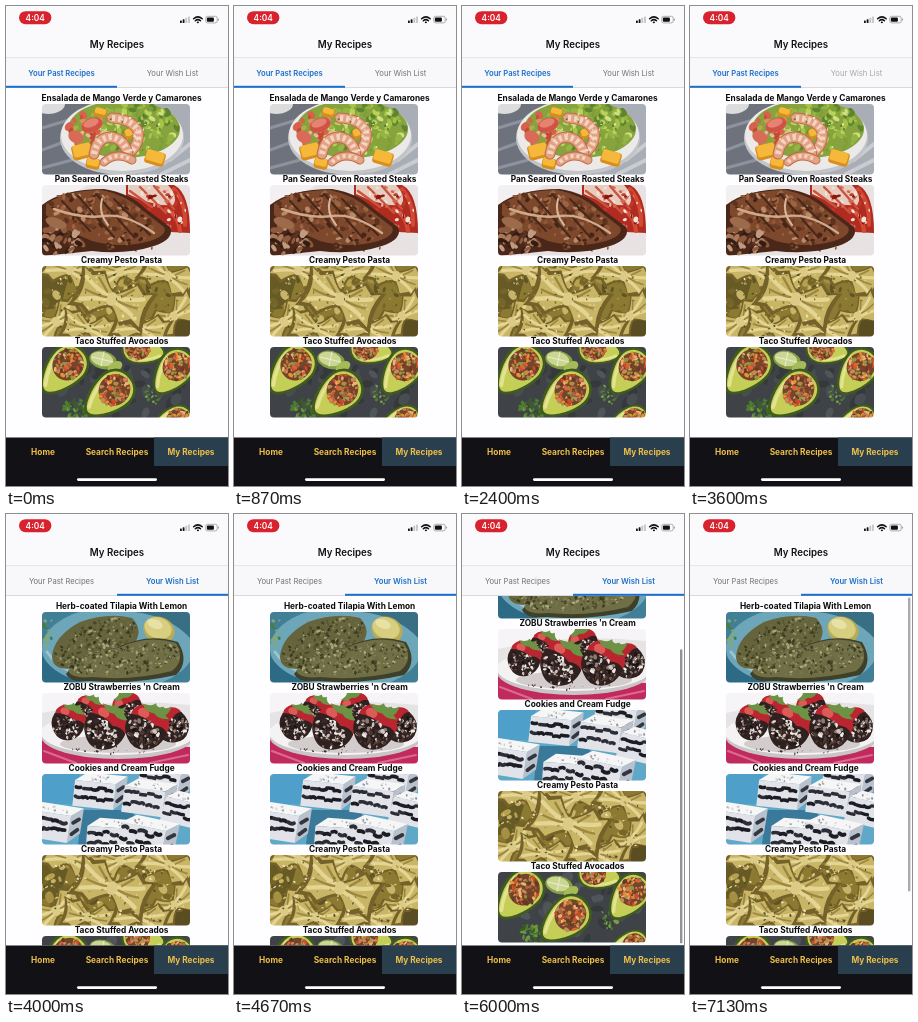
These frames come from a looping animation (222 by 480 pixels, 7.19 s). An HTML page:

```html
<!DOCTYPE html>
<html lang="en">
<head>
<meta charset="utf-8">
<title>My Recipes</title>
<style>
html, body { margin: 0; width: 100%; height: 100%; overflow: hidden; background: #fff; }
svg { display: block; width: 100%; height: 100%; }
text { font-family: Inter, "Liberation Sans", sans-serif; text-anchor: middle; }
.dish { font-size: 8.3px; font-weight: 700; fill: #0b0b0b; }
.tab { font-size: 7.65px; }
.nav { font-size: 8.3px; font-weight: 700; fill: #eebf4a; }
</style>
</head>
<body>
<svg id="stage" viewBox="0 0 222 480" xmlns="http://www.w3.org/2000/svg"></svg>
<script>
const LOOP = 7190, STEP = 1000 / 15;
const TOP = 82, BOTTOM = 431.5, PITCH = 81;
const SWITCH = 3660, MAX_SCROLL = 64, BAR = 294;
const BLUE = '#1a6fca';

let seed = 7;
const rnd = () => (seed = (seed * 16807) % 2147483647) / 2147483647;
const pick = list => list[Math.floor(rnd() * list.length)];
const n = v => v.toFixed(1);

const oval = (x, y, rx, ry, fill, turn = 0) =>
  `<ellipse cx="${n(x)}" cy="${n(y)}" rx="${n(rx)}" ry="${n(ry)}" fill="${fill}" transform="rotate(${n(turn)} ${n(x)} ${n(y)})"/>`;
const box = (x, y, w, h, fill, r = 0, turn = 0) =>
  `<rect x="${x}" y="${y}" width="${w}" height="${h}" rx="${r}" fill="${fill}" transform="rotate(${turn} ${x + w / 2} ${y + h / 2})"/>`;
const shape = (d, fill) => `<path d="${d}" fill="${fill}"/>`;
const line = (d, stroke, w, dash = '') =>
  `<path d="${d}" fill="none" stroke="${stroke}" stroke-width="${w}" stroke-linecap="${dash ? 'butt' : 'round'}" stroke-dasharray="${dash}"/>`;
const text = (x, y, s, attrs) => `<text x="${x}" y="${y}" ${attrs}>${s}</text>`;
const place = (x, y, turn, size, body) =>
  `<g transform="translate(${x} ${y}) rotate(${turn}) scale(${size})">${body}</g>`;

// Small random blobs inside a turned ellipse
function specks(count, x, y, rx, ry, colors, size, turn = 0) {
  let out = '';
  for (let i = 0; i < count; i++) {
    const a = rnd() * 2 * Math.PI, r = Math.sqrt(rnd());
    const s = size * (0.5 + rnd() * 0.7);
    out += oval(x + rx * r * Math.cos(a), y + ry * r * Math.sin(a), s, s * (0.4 + rnd() * 0.4), pick(colors), rnd() * 180);
  }
  return `<g transform="rotate(${turn} ${x} ${y})">${out}</g>`;
}

const shrimp = (d, w) => line(d, '#bd6c4a', w) + line(d, '#e3a283', w - 2) + line(d, '#f4d5c2', w - 5, '3 3');
const mango = (x, y, w, h, turn) => box(x, y, w, h, '#d98e1c', 3, turn) + box(x + 1, y, w - 2, h - 3, '#f5b83a', 2, turn);

function salad() {
  return box(0, 0, 148, 71, '#6d727c') + line('M0 24L40 12M0 46L22 38M0 64L30 56', '#8d929c', 3)
    + oval(6, 0, 17, 10, '#dddcdc') + shape('M112 0H148V71H96Z', '#a9adb5') + line('M128 56L148 40M120 70L148 56', '#c9ccd1', 4)
    + oval(80, 34, 62, 37, '#c3c4c8') + oval(80, 31, 61, 36, '#eceae8') + oval(82, 25, 56, 29, '#86a33e')
    + specks(110, 94, 24, 44, 25, ['#b9d257', '#7e9f38', '#d0e07f', '#a6c448', '#5f8430', '#94b544'], 3.8)
    + specks(30, 45, 28, 20, 20, ['#d8604c', '#e48a6e', '#a9b04a', '#c64936', '#efb79b'], 4.5)
    + mango(30, 40, 20, 15, -14) + mango(44, 54, 14, 11, 12) + mango(103, 47, 20, 14, 16)
    + mango(82, 24, 14, 10, -20) + mango(52, 4, 13, 9, 14)
    + oval(50, 21, 11, 7, '#d05345', -20) + oval(49, 19, 8, 4, '#e58272', -20) + oval(34, 33, 8, 6, '#d96a58', 25)
    + shrimp('M70 14Q90 15 96 27Q98 40 88 48', 11) + shrimp('M52 50Q55 33 70 33Q84 36 86 52', 11)
    + shrimp('M62 58Q74 47 90 56', 9)
    + specks(30, 84, 32, 42, 24, ['#54782c', '#e0e9a8', '#f4e2d3'], 1.4);
}

function steak() {
  return box(0, 0, 148, 71, '#e9e2e2') + shape('M0 0H46L12 20L0 26Z', '#f3f0f2')
    + shape('M84 0H132Q148 8 148 48L128 47Q108 32 84 14Z', '#b02c20')
    + shape('M86 0H126Q136 10 132 20Q112 22 86 9Z', '#e6cdbf')
    + line('M88 6L110 22M98 2L124 28M112 1L132 24', '#c9543f', 2.4) + line('M132 4Q144 18 143 40M124 24Q136 30 138 46', '#d34a34', 4)
    + specks(50, 118, 22, 28, 20, ['#f1e3da', '#86180f', '#d56450', '#c23626', '#e6b3a1'], 2.5, 20)
    + shape('M0 20Q20 4 62 4Q88 8 104 24L128 42Q133 54 112 61Q84 70 50 66L0 71Z', '#4a2718')
    + shape('M4 19Q24 5 60 5Q84 10 100 25L122 42Q126 50 108 56Q80 64 50 56Q20 44 4 30Z', '#7d482c')
    + specks(130, 60, 32, 54, 22, ['#9d6444', '#5d321d', '#b98a68', '#6d3c24', '#8f5638', '#452416'], 3, 14)
    + line('M20 16L48 46M36 11L72 52M54 9L92 52M72 14L108 50', '#48281a', 2)
    + line('M12 24Q40 34 62 31T112 48', '#cfa98a', 2.4) + line('M60 14Q56 28 66 40', '#d8b89c', 2)
    + specks(55, 20, 55, 23, 14, ['#5c3322', '#8e5a3d', '#341c13', '#a87a5b', '#c19b80'], 4)
    + oval(14, 38, 11, 5, '#9c6b4c', 20) + specks(14, 84, 62, 28, 5, ['#4c2a1a', '#8a5a3c'], 2.5);
}

// Bow-tie pasta with pleats and a pinched middle
function bow(x, y, size, turn) {
  return place(x, y, turn, size,
    shape('M-23-13L-16-11L-9-14Q-3-5 0-4Q6-7 11-14L17-10L24-12Q19 0 23 13L15 10L9 13Q4 6 0 5Q-5 7-10 14L-15 10L-23 12Q-18 0-23-13Z', '#74622a')
    + shape('M-21-12L-15-9L-9-12Q-3-4 1-3Q6-6 11-12L16-8L21-10Q17 0 20 10L14 7L8 11Q3 4 0 3Q-6 6-10 11L-15 8L-20 9Q-15 0-21-12Z', '#c9b566')
    + line('M-18-7Q-8-1 0-1Q9-2 17-6M-17 6Q-6 1 0 1Q8 2 16 6', '#e4d594', 2.4)
    + line('M-16 0Q-8 1-3 0M4 0Q10 1 16 0M-11-9L-4-3M10-9L5-3', '#9c8640', 1.3) + oval(0, 0, 3, 4, '#dccb86'));
}

function pasta() {
  return box(0, 0, 148, 71, '#8c7a33') + shape('M100 71Q136 58 148 34V71Z', '#5a4d22') + shape('M0 8L26 14L18 42L0 44Z', '#675a25')
    + specks(80, 74, 35, 78, 38, ['#75652a', '#b6a14f', '#a48f42', '#5f5224', '#c7b468'], 5)
    + bow(28, 4, 1.3, 18) + bow(78, 6, 1.2, -22) + bow(126, 10, 1.3, 24) + bow(14, 56, 1.3, -32)
    + bow(132, 50, 1.2, -38) + bow(46, 62, 1.2, 12) + bow(98, 62, 1.3, 14) + bow(70, 33, 1.75, 20)
    + specks(150, 74, 35, 78, 38, ['#626a2b', '#8b7a36', '#4b5222', '#ebe0af', '#b39d4c', '#d9c981'], 1.3);
}

// Halved avocado, pointed toward its lower end, with a round heap of filling
function avocado(x, y, size, turn) {
  const half = 'M0-22C13-22 19-12 18-1C17 12 8 31 0 31C-8 31-17 12-18-1C-19-12-13-22 0-22Z';
  return place(x, y, turn, size,
    `<path d="${half}" fill="#c5cf58" stroke="#405a20" stroke-width="2.6"/>`
    + line('M-14-5Q-13 12-3 26', '#e3e291', 3.5) + oval(0, -3, 14.5, 15.5, '#75442a')
    + specks(75, 0, -3, 14, 15, ['#a4663f', '#cf4a2a', '#e59238', '#653a24', '#c58a5a', '#dd6438', '#8d9a42', '#e8b478'], 2.4));
}

function tacos() {
  return box(0, 0, 148, 71, '#3f4347') + specks(40, 74, 35, 72, 34, ['#484d51', '#35393c', '#50555a'], 7)
    + oval(61, 13, 14, 9, '#86a143', 14) + oval(60, 12, 11.5, 7, '#cbd594', 14) + line('M50 10L71 15M62 5L59 19', '#eaf0c8', 1)
    + oval(73, 20, 8, 5, '#a6bb58', -30)
    + specks(40, 34, 62, 13, 10, ['#4f7d30', '#6c993f', '#3a5f24'], 2.4)
    + specks(24, 112, 45, 9, 12, ['#4d7a2f', '#78a046'], 1.8)
    + avocado(98, 2, 0.8, -78) + avocado(133, 22, 0.95, 38) + avocado(134, 73, 0.75, 72)
    + avocado(24, 20, 1.05, 42) + avocado(70, 45, 1.05, 50);
}

function tilapia() {
  const crumbs = ['#8c8860', '#55552f', '#aaa57c', '#45462a', '#6d6c43', '#777650', '#36381f'];
  return box(0, 0, 148, 71, '#417f97') + oval(76, 36, 76, 42, '#6da6b8') + shape('M0 44Q14 66 48 71H0Z', '#2d6a86')
    + line('M5 40Q22 64 60 68', '#9cc4cd', 3) + shape('M92 0H148V26Q128 4 92 0Z', '#396f85')
    + oval(117, 18, 16, 13, '#b7ab55', 20) + oval(116, 16, 14, 10.5, '#d8ce80', 20) + oval(113, 12, 8, 4.5, '#e8e1a6', 20)
    + shape('M10 44Q12 24 38 10Q66 0 90 6Q102 18 92 32Q60 36 34 56Q10 60 10 44Z', '#65643c')
    + specks(220, 53, 30, 44, 19, crumbs, 1.8, -26)
    + shape('M24 62Q40 40 74 36Q106 20 136 30Q148 50 134 63Q90 73 48 69Q28 71 24 62Z', '#3f402a')
    + shape('M26 59Q42 40 76 36Q106 22 134 31Q144 48 130 59Q90 69 50 65Q30 67 26 59Z', '#6f6e45')
    + specks(240, 85, 48, 56, 14, crumbs, 1.8, -8)
    + specks(12, 6, 20, 6, 14, ['#4b7a4a', '#88a868'], 2.5);
}

function berry(x, y, size, turn) {
  return place(x, y, turn, size,
    shape('M-17-8Q-14-19 0-18Q14-19 17-8Q17 8 0 18Q-17 8-17-8Z', '#b92630') + oval(-8, -10, 5, 4, '#dd5a56')
    + shape('M-17-4Q-6-9 4-5Q12-9 17-5Q19 8 10 15Q0 22-9 15Q-19 8-17-4Z', '#2f2120')
    + specks(95, 0, 5, 15, 11, ['#191314', '#efe9e4', '#503b35', '#271c1b', '#8e7a70', '#cfc4bd', '#3a2a27'], 1.9)
    + shape('M-13-16Q-5-17-3-22Q0-18 4-23Q6-17 13-16Q5-11 0-14Q-6-11-13-16Z', '#6c9244'));
}

function berries() {
  return box(0, 0, 148, 71, '#e6e3e4') + shape('M0 0H148V12Q70 4 0 20Z', '#f6f4f6')
    + shape('M0 44L148 54V71H0Z', '#c02a5c') + line('M2 58L34 70M108 70L146 62', '#dc6a90', 2)
    + oval(76, 43, 77, 23, '#c9c4c6') + oval(76, 40, 77, 22, '#f5f2f3') + oval(76, 51, 58, 9, '#d3cccd')
    + berry(45, 18, 0.8, 30) + berry(86, 16, 0.85, -20) + berry(26, 30, 0.95, 24) + berry(130, 33, 0.95, -40)
    + berry(63, 35, 1.2, 34) + berry(104, 35, 1.2, 30)
    + specks(20, 76, 57, 54, 4, ['#3a2b28', '#8b7b75'], 1.2);
}

// White block with two dark cookie layers on each side
function cube(x, y, size, turn) {
  let bits = '';
  for (const row of [15, 25])
    for (let i = 0; i < 5; i++) {
      const a = 2 + i * 7.5, b = row + rnd() * 4 - 2;
      bits += line(`M${a} ${n(b)}q3 ${n(rnd() * 4 - 2)} ${n(4 + rnd() * 3)} 0`, pick(['#1b1c24', '#2c2d36']), 3.6);
    }
  return place(x, y, turn, size,
    shape('M0 9L12 0H52L41 9Z', '#f7f6f6') + shape('M41 9L52 0V24L41 35Z', '#b9c1cd') + shape('M0 9H41V35H0Z', '#e2e3e8') + bits
    + line('M44 15l5-4M44 26l5-5', '#33353f', 3.6) + specks(10, 25, 5, 16, 3, ['#cfd1d6', '#9a9ca4'], 1.4));
}

function fudge() {
  return box(0, 0, 148, 71, '#5fa8c8') + shape('M0 0H38L30 30H0Z', '#4e9fc9') + shape('M40 36H92V71H36Z', '#39799a')
    + cube(100, -15, 1, 10) + cube(34, -3, 1, 6) + cube(84, 3, 1, 8) + cube(126, 14, 0.95, 14)
    + cube(-12, 26, 1.05, 9) + cube(46, 43, 1, 4) + cube(82, 38, 1.1, 12);
}

function list(id, dishes) {
  return `<g id="${id}">` + dishes.map(([name, draw], i) =>
    text(115.6, 95.4 + i * PITCH, name, 'class="dish"')
    + `<g transform="translate(36 ${98 + i * PITCH})" clip-path="url(#photo)"><g filter="url(#soft)">${draw()}</g></g>`
  ).join('') + '</g>';
}

const pastaDish = ['Creamy Pesto Pasta', pasta], tacoDish = ['Taco Stuffed Avocados', tacos];
const past = [['Ensalada de Mango Verde y Camarones', salad], ['Pan Seared Oven Roasted Steaks', steak], pastaDish, tacoDish];
const wish = [['Herb-coated Tilapia With Lemon', tilapia], ["ZOBU Strawberries 'n Cream", berries],
  ['Cookies and Cream Fudge', fudge], pastaDish, tacoDish];

const statusBar = box(13, 5.2, 32.4, 13, '#d8232f', 6.5)
  + text(29.2, 14.8, '4:04', 'font-size="8.3" font-weight="600" fill="#fff"')
  + box(174, 14.4, 1.8, 2.6, '#111', 0.5) + box(176.7, 13.2, 1.8, 3.8, '#111', 0.5)
  + box(179.4, 11.8, 1.8, 5.2, '#c4c4c6', 0.5) + box(182.1, 10.4, 1.8, 6.6, '#c4c4c6', 0.5)
  + line('M187.6 12.8Q191.9 9 196.2 12.8M189.3 14.7Q191.9 12.5 194.5 14.7', '#111', 1.5) + oval(191.9, 16.3, 1.1, 0.9, '#111')
  + '<rect x="199.8" y="10.3" width="11.4" height="6.6" rx="1.8" fill="none" stroke="#8b8b8d" stroke-width=".7"/>'
  + box(200.9, 11.4, 7, 4.4, '#111', 1) + box(212, 12.6, 0.9, 2, '#8b8b8d', 0.4);

const stage = document.getElementById('stage');
stage.innerHTML = `<defs>
  <clipPath id="photo"><rect width="148" height="70.5" rx="4"/></clipPath>
  <clipPath id="view"><rect y="${TOP}" width="222" height="${BOTTOM - TOP}"/></clipPath>
  <filter id="soft" x="0" y="0" width="1" height="1"><feGaussianBlur stdDeviation=".6"/></filter></defs>`
  + box(0, 0, 222, 480, '#fefdff')
  + `<g clip-path="url(#view)">${list('past', past)}${list('wish', wish)}</g>`
  + '<rect id="bar" x="218" width="2.4" rx="1.2" fill="#000"/>'
  + box(0, 0, 222, 82, '#faf9fb') + box(0, 51.6, 222, 0.6, '#c9c9cc') + box(0, 52.2, 222, 29.8, '#f8f7fa')
  + box(0, 81, 222, 0.8, '#d3d3d6') + `<rect id="mark" y="79.8" width="111" height="2" fill="${BLUE}"/>`
  + statusBar + text(111, 42.4, 'My Recipes', 'font-size="9.7" font-weight="600" fill="#111"')
  + text(55.5, 69.7, 'Your Past Recipes', 'class="tab" id="tabPast"')
  + text(166.5, 69.7, 'Your Wish List', 'class="tab" id="tabWish"')
  + box(0, BOTTOM, 222, 49, '#121116') + box(148, BOTTOM, 74, 28.5, '#2a3f4d')
  + text(37, 449, 'Home', 'class="nav"') + text(111, 449, 'Search Recipes', 'class="nav"') + text(185, 449, 'My Recipes', 'class="nav"')
  + box(71, 472.2, 80, 2.7, '#fff', 1.35);

const el = id => document.getElementById(id);
const set = (id, attrs) => { for (const k in attrs) el(id).setAttribute(k, attrs[k]); };
const clamp = v => Math.min(1, Math.max(0, v));
const span = (t, a, b) => clamp((t - a) / (b - a));
const smooth = p => p * p * (3 - 2 * p);
const easeOut = p => 1 - (1 - p) ** 3;

// Drag past the end, spring back, then flick to the top
function scrollAt(t) {
  if (t < 5270) return 105 * smooth(span(t, 4720, 5260));
  if (t < 6060) return 105 - (105 - MAX_SCROLL) * easeOut(span(t, 5330, 5860));
  return MAX_SCROLL * (1 - smooth(span(t, 6060, 6860)));
}

function styleTab(id, on, opacity) {
  set(id, { fill: on ? BLUE : '#707378', 'font-weight': on ? 600 : 400, opacity });
}

function render(t) {
  const onWish = t >= SWITCH, scroll = scrollAt(t);
  set('past', { display: onWish ? 'none' : 'inline' });
  set('wish', { display: onWish ? 'inline' : 'none', transform: `translate(0 ${-scroll})` });
  set('mark', { x: onWish ? 111 : 0 });
  styleTab('tabPast', !onWish, 1);
  styleTab('tabWish', onWish, t >= 3530 && !onWish ? 0.6 : 1);
  const over = Math.max(0, scroll - MAX_SCROLL);
  const y = 83.5 + Math.min(scroll, MAX_SCROLL) * 0.81 + over;
  set('bar', { y, height: BAR - over, opacity: t < 4730 ? 0 : t < 7120 ? 0.42 : 0.33 });
}

function tick(now) {
  const t = now % LOOP;
  render(Math.floor((t + 4) / STEP) * STEP);
  requestAnimationFrame(tick);
}
render(0);
requestAnimationFrame(tick);
</script>
</body>
</html>
```
